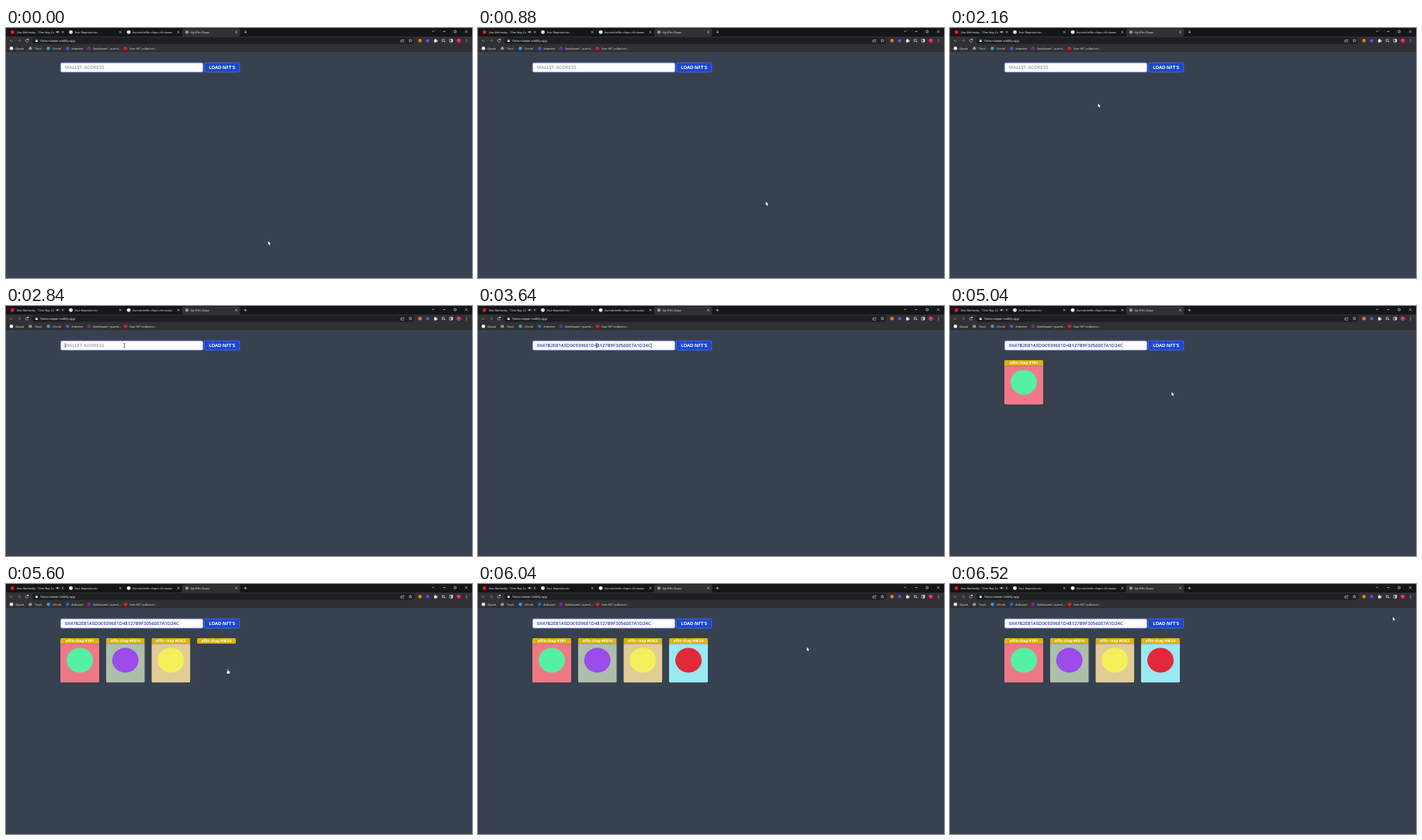
These frames come from a looping animation (600 by 323 pixels, 6600 ms). An HTML page with a canvas:

```html
<!DOCTYPE html>
<html lang="en">
<head>
<meta charset="utf-8">
<title>NFT viewer</title>
<style>
  html, body { margin: 0; width: 100%; height: 100%; overflow: hidden; background: #374150; }
  canvas { display: block; width: 600px; height: 323px; }
</style>
</head>
<body>
<canvas id="stage"></canvas>
<script>
const W = 600, H = 323, LOOP = 6600;
const canvas = document.getElementById('stage');
const ctx = canvas.getContext('2d');
const ratio = window.devicePixelRatio || 1;
canvas.width = W * ratio;
canvas.height = H * ratio;

const FOCUS = 2800, PASTE = 3280, CLICK = 4360;
const WALLET = '0X47B2E81A5D0C9396E1D48127B9F30560E7A1D24C';
const ICON = '#dfe1e4', DIM = '#7d8084', TEXT = '#f1f3f4';

// Pointer waypoints: time, x, y
const path = [
  [0, 337.5, 275.3], [40, 337.5, 275.3], [680, 370.5, 224.3], [1400, 370.5, 224.3],
  [1600, 387, 192], [2080, 218, 158], [2160, 190.7, 97.5], [2440, 163, 64],
  [2720, 152.5, 51], [3640, 152.5, 51], [4220, 279, 53], [4440, 279, 53],
  [4920, 285.3, 111], [5720, 285.3, 111], [6080, 440, 78], [6280, 581, 47],
  [6400, 570, 42.3], [LOOP, 570, 42.3]
];

const cards = [
  { x: 70, id: 191, shown: 5040, loaded: 5040, back: '#f17885', tone: '#55f0a4' },
  { x: 128.7, id: 6514, shown: 5160, loaded: 5240, back: '#adbfab', tone: '#9b4cea' },
  { x: 187.3, id: 5352, shown: 5320, loaded: 5400, back: '#e1cc94', tone: '#f6ef5c' },
  { x: 246, id: 6624, shown: 5480, loaded: 5640, back: '#99e8f2', tone: '#e2293a' }
];

function rect(x, y, w, h, color) {
  ctx.fillStyle = color;
  ctx.fillRect(x, y, w, h);
}

function box(x, y, w, h, radius, fill, stroke, lineWidth = 1) {
  ctx.beginPath();
  ctx.roundRect(x, y, w, h, radius);
  if (fill) { ctx.fillStyle = fill; ctx.fill(); }
  if (stroke) { ctx.strokeStyle = stroke; ctx.lineWidth = lineWidth; ctx.stroke(); }
}

function dot(x, y, r, color) {
  ctx.fillStyle = color;
  ctx.beginPath();
  ctx.arc(x, y, r, 0, Math.PI * 2);
  ctx.fill();
}

function ring(x, y, r, color, from = 0, to = Math.PI * 2) {
  ctx.strokeStyle = color;
  ctx.lineWidth = 0.6;
  ctx.beginPath();
  ctx.arc(x, y, r, from, to);
  ctx.stroke();
}

function line(color, width, ...points) {
  ctx.strokeStyle = color;
  ctx.lineWidth = width;
  ctx.beginPath();
  for (let i = 0; i < points.length; i += 2) ctx.lineTo(points[i], points[i + 1]);
  ctx.stroke();
}

function label(str, x, y, size, color, weight = 500, align = 'left') {
  ctx.font = `${weight} ${size}px "Open Sans", "Noto Sans", sans-serif`;
  ctx.textAlign = align;
  ctx.textBaseline = 'alphabetic';
  ctx.fillStyle = color;
  ctx.fillText(str, x, y);
}

function clippedLabel(str, x, y, width) {
  ctx.save();
  ctx.beginPath();
  ctx.rect(x, y - 5, width, 7);
  ctx.clip();
  label(str, x, y, 3.6, TEXT);
  ctx.restore();
}

function cross(x, y, r = 1.3) {
  line(ICON, 0.6, x - r, y - r, x + r, y + r);
  line(ICON, 0.6, x - r, y + r, x + r, y - r);
}

function globe(x, y) {
  dot(x, y, 2.1, '#b4b7ba');
  line('#303236', 0.6, x - 1.8, y - 0.6, x, y, x + 0.6, y + 1.8);
  line('#303236', 0.5, x + 0.2, y - 1.8, x + 1.6, y);
}

function drawTabs() {
  rect(0, 0, W, 11, '#151619');
  box(227, 0.5, 74.5, 12, 2, '#303134');

  dot(8.3, 5.3, 2.4, '#f01818');
  clippedLabel('Dex Marlowby - "Dim Way Go"', 14, 6.7, 48);
  rect(64.5, 4.6, 1.1, 1.5, ICON);
  line(ICON, 0.8, 65.5, 5.3, 66.7, 4, 66.7, 6.7);
  ring(66.8, 5.3, 1.6, ICON, -0.8, 0.8);

  dot(83.5, 5.3, 2.4, '#f2f2f2');
  clippedLabel('Your Repositories', 88.2, 6.7, 52);
  dot(158, 5.3, 2.4, '#f2f2f2');
  clippedLabel('Korvelin/elfin-chaps-nft-viewer', 163, 6.7, 53.5);
  globe(233, 5.3);
  clippedLabel('My Elfin Chaps', 237.5, 6.7, 54);
  [73, 147.2, 222, 296.5].forEach(x => cross(x, 5.3));

  line(ICON, 0.6, 306.5, 5.3, 310.1, 5.3);
  line(ICON, 0.6, 308.3, 3.5, 308.3, 7.1);
  line(ICON, 0.6, 548.6, 3.6, 550, 5, 551.4, 3.6);
  line(ICON, 0.6, 562.5, 4.6, 566, 4.6);
  ctx.strokeRect(577, 3.4, 2.6, 2.6);
  cross(592.5, 4.6, 1.5);
}

function drawToolbar() {
  rect(0, 11, W, 21, '#303134');
  box(33, 12, 493, 8.6, 4.3, '#1e1f21');

  const y = 16.3;
  line(DIM, 0.6, 9, y, 5, y);
  line(DIM, 0.6, 6.7, y - 1.7, 5, y, 6.7, y + 1.7);
  line(DIM, 0.6, 15, y, 19, y);
  line(DIM, 0.6, 17.3, y - 1.7, 19, y, 17.3, y + 1.7);
  ring(27, y, 1.8, ICON, 0.4, 5.6);
  rect(27.6, y - 2.2, 1.5, 1.5, ICON);

  box(38, y - 0.5, 2.8, 2.3, 0.3, ICON);
  ring(39.4, y - 0.6, 0.9, ICON, Math.PI, 0);
  label('frens-viewer.netlify.app', 44.3, 17.8, 4.1, TEXT);

  line(ICON, 0.5, 509.7, y - 0.8, 508.5, y - 0.8, 508.5, y + 1.9, 512, y + 1.9, 512, y + 0.8);
  line(ICON, 0.5, 509.7, y + 0.6, 510.3, y - 0.9, 512.4, y - 0.9);
  line(ICON, 0.5, 511.5, y - 1.9, 512.6, y - 0.9, 511.5, y);
  drawStar(520.7, y, 2.2);

  dot(533, y, 2.3, '#e2792d');
  dot(543, y, 2.1, '#6651d8');
  box(551.2, y - 1.2, 3.4, 3.3, 0.4, '#f0f1f2');
  dot(552.9, y - 1.5, 0.8, '#f0f1f2');
  dot(555, y + 0.4, 0.8, '#f0f1f2');
  for (let i = 0; i < 3; i++) line(ICON, 0.6, 561, y - 1.5 + i * 1.3, i < 2 ? 564.8 : 563, y - 1.5 + i * 1.3);
  dot(564.7, y + 1.2, 0.8, ICON);
  box(571.2, y - 1.9, 3.7, 3.7, 0.3, null, '#f0f1f2', 0.6);
  rect(573.3, y - 1.9, 1.7, 3.7, '#f0f1f2');
  dot(583, y, 2.8, '#d51b78');
  label('P', 583, y + 1.1, 3, '#fff', 400, 'center');
  for (let i = -1; i <= 1; i++) dot(593, y + i * 1.6, 0.5, ICON);
}

function drawStar(x, y, r) {
  ctx.beginPath();
  for (let i = 0; i < 10; i++) {
    const angle = -Math.PI / 2 + i * Math.PI / 5;
    const reach = i % 2 ? r * 0.45 : r;
    ctx.lineTo(x + Math.cos(angle) * reach, y + Math.sin(angle) * reach);
  }
  ctx.closePath();
  ctx.strokeStyle = ICON;
  ctx.lineWidth = 0.5;
  ctx.stroke();
}

function drawBookmarks() {
  const marks = [
    [7, 12, '#f2f2f2', 'Glyvok'],
    [31.3, 37, null, 'Trovil'],
    [54.5, 60, '#3197e3', 'Chirrel'],
    [79.3, 84.3, '#2665ce', 'Ardovine'],
    [107, 112, '#8122a3', 'Dashboard | quorvl...'],
    [153.8, 158.8, '#f01818', 'Your NFT collection...']
  ];
  for (const [iconX, textX, color, name] of marks) {
    if (color) dot(iconX, 26.3, 2.3, color);
    else globe(iconX, 26.3);
    label(name, textX, 27.6, 3.6, TEXT);
  }
  rect(0, 31.6, W, 0.6, '#4a4d52');
}

function drawForm(t) {
  box(70.3, 45, 183.4, 12.1, 1.8, '#fff', '#7088ea', 0.8);
  if (t < PASTE) label('WALLET ADDRESS', 75.8, 53.3, 6, '#979cab', 600);
  else label(WALLET, 75.8, 53.3, 5.9, '#34369a', 600);

  const since = t < PASTE ? t - FOCUS : t - PASTE;
  if (t >= FOCUS && t < CLICK && since % 1000 < 500) {
    const end = t < PASTE ? 75.8 : 76.1 + ctx.measureText(WALLET).width;
    rect(end, 48, 0.6, 6.5, '#222');
  }

  box(255.4, 45, 45.4, 12.1, 1.8, '#1d48ce', '#4675e8', 0.8);
  label("LOAD NFT'S", 278.1, 53.3, 5.85, '#fff', 700, 'center');
}

function drawCard({ x, id, shown, loaded, back, tone }, t) {
  if (t < shown) return;
  const height = t < loaded ? 7.5 : 57.6;
  ctx.save();
  ctx.beginPath();
  ctx.roundRect(x, 69.8, 50, height, 2);
  ctx.clip();
  rect(x, 69.8, 50, 7.5, '#deb016');
  if (t >= loaded) {
    rect(x, 77.3, 50, 50.1, back);
    ctx.fillStyle = tone;
    ctx.beginPath();
    ctx.ellipse(x + 25, 98.5, 17, 16, 0, 0, Math.PI * 2);
    ctx.fill();
  }
  label(`elfin chap #${id}`, x + 25, 75.3, 4.75, '#fff', 700, 'center');
  ctx.restore();
}

function pointerAt(t) {
  const i = path.findIndex((p, k) => k && t <= p[0]);
  const [t0, x0, y0] = path[i - 1];
  const [t1, x1, y1] = path[i];
  const u = (t - t0) / (t1 - t0);
  return [x0 + (x1 - x0) * u, y0 + (y1 - y0) * u];
}

function drawShape(x, y, points) {
  ctx.beginPath();
  for (let i = 0; i < points.length; i += 2) ctx.lineTo(x + points[i], y + points[i + 1]);
  ctx.closePath();
  ctx.lineJoin = 'round';
  ctx.strokeStyle = '#15181d';
  ctx.lineWidth = 0.7;
  ctx.stroke();
  ctx.fillStyle = '#fff';
  ctx.fill();
}

function drawPointer(t) {
  const [x, y] = pointerAt(t);
  const within = (l, top, r, b) => x > l && x < r && y > top && y < b;
  const overCard = cards.some(c => t >= c.shown && within(c.x, 70, c.x + 50, 128));

  if (within(70, 45, 254, 57)) {
    line('#222', 0.6, x, y - 2.7, x, y + 2.7);
    line('#222', 0.6, x - 1.2, y - 2.7, x + 1.2, y - 2.7);
    line('#222', 0.6, x - 1.2, y + 2.7, x + 1.2, y + 2.7);
  } else if (within(255, 45, 301, 57) || overCard) {
    drawShape(x, y, [0, -1, 0.9, -1, 1, 1.3, 3, 1.8, 3, 3.6, 2.3, 5, -0.2, 5, -1.7, 2.8, -1.2, 2.1, 0, 2.8]);
  } else {
    drawShape(x, y, [0, 0, 0, 4.9, 1.1, 3.9, 1.8, 5.6, 2.7, 5.2, 2, 3.6, 3.5, 3.5]);
  }
}

function draw(t) {
  ctx.setTransform(ratio, 0, 0, ratio, 0, 0);
  ctx.textRendering = 'geometricPrecision';
  rect(0, 0, W, H, '#374150');
  drawTabs();
  drawToolbar();
  drawBookmarks();
  drawForm(t);
  cards.forEach(card => drawCard(card, t));
  drawPointer(t);
}

const start = performance.now();
function tick() {
  draw((performance.now() - start) % LOOP);
  requestAnimationFrame(tick);
}
tick();
</script>
</body>
</html>
```
